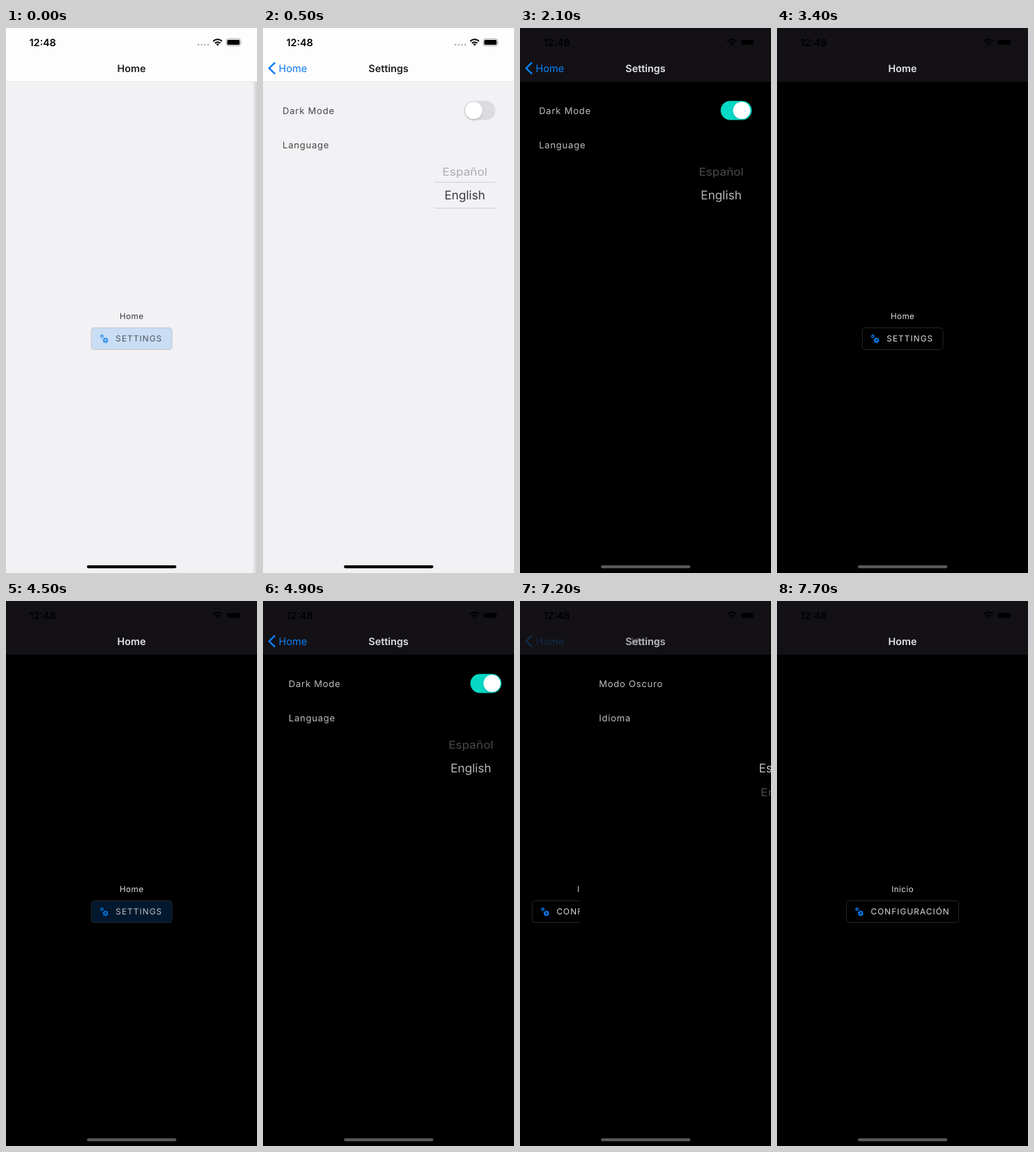
An HTML page for the animation above (8 s loop, 360x779 px).

```html
<!DOCTYPE html>
<html lang="en">
<head>
<meta charset="utf-8">
<title>Theme and language settings</title>
<style>
html, body { margin: 0; width: 100%; height: 100%; overflow: hidden; }
svg {
  display: block; width: 100vw; height: 100vh;
  font-family: Inter, Roboto, sans-serif; text-rendering: geometricPrecision;
  --bg: #f2f1f4; --head: #fefdfe; --rule: #e4e3e6; --ink: #000; --dots: #bcbbbd;
  --title: #1f1f21; --label: #464648; --body: #39393b; --blue: #0a7aee;
  --edge: #c3bebe; --press: #c9def5; --bar: #000; --track: #dcdbdf;
  --row: #3c3c3e; --dim: #adacaf; --line: #cccbce; --shell: #8d8c8e;
}
svg.dark {
  --bg: #000; --head: #131115; --rule: #161518; --ink: #000; --dots: #131115;
  --title: #e4e3e6; --label: #bdbdbf; --body: #dededf; --blue: #0a84ff;
  --edge: #2c2c2d; --press: #02182e; --bar: #585858; --track: #05d8c4;
  --row: #b6b6b8; --dim: #4a4a4b; --line: #000; --shell: #131115;
}
.bg { fill: var(--bg); }
.title { font-size: 14.4px; font-weight: 600; fill: var(--title); text-anchor: middle; }
.label { font-size: 13px; letter-spacing: .78px; fill: var(--label); }
.small { font-size: 11.7px; letter-spacing: .4px; fill: var(--body); text-anchor: middle; }
.caps { font-size: 11.8px; letter-spacing: 1.08px; fill: var(--body); }
.row { font-size: 17.2px; text-anchor: middle; }
.gear circle { fill: none; stroke: var(--blue); }
</style>
</head>
<body>
<svg id="stage" viewBox="0 0 360 779">
  <defs>
    <clipPath id="band"><rect x="230" y="220.5" width="120" height="37"/></clipPath>
    <clipPath id="rest"><path d="M230 180h120v40.5h-120zM230 257.5h120v45h-120z"/></clipPath>
    <linearGradient id="shade"><stop offset="0" stop-opacity="0"/><stop offset="1" stop-opacity=".14"/></linearGradient>
    <filter id="soft" x="-30%" y="-30%" width="160%" height="170%">
      <feDropShadow dx="0" dy="1.6" stdDeviation="1.6" flood-opacity=".18"/>
    </filter>
    <g id="wheel">
      <text id="english" class="row" y="6.3">English</text>
      <text id="spanish" class="row" y="6.3">Español</text>
    </g>
  </defs>

  <g id="home">
    <rect class="bg" width="360" height="779"/>
    <text id="greet" class="small" x="180.2" y="416"></text>
    <rect id="button" y="428.6" height="31" rx="4" stroke="var(--edge)" stroke-width=".9"/>
    <g id="face">
      <g class="gear">
        <circle cx="15.2" cy="440.7" r="1.6" stroke-width="1.1"/>
        <circle cx="15.2" cy="440.7" r="2.3" stroke-width=".9" pathLength="12" stroke-dasharray="1"/>
        <circle cx="20.3" cy="446.4" r="2.3" stroke-width="1.8"/>
        <circle cx="20.3" cy="446.4" r="3.6" stroke-width="1.1" pathLength="12" stroke-dasharray="1"/>
      </g>
      <text id="caption" class="caps" x="34.9" y="448.2"></text>
    </g>
  </g>

  <g id="settings">
    <rect id="shadow" x="-7" width="7" height="779" fill="url(#shade)"/>
    <rect class="bg" width="360" height="779"/>
    <text id="mode" class="label" x="27.2" y="122.7"></text>
    <text id="lang" class="label" x="27.2" y="171.8"></text>
    <rect x="287.8" y="104.2" width="44.6" height="27.2" rx="13.6" fill="var(--track)"/>
    <rect id="knob" y="105.6" height="24.4" rx="12.2" fill="#fff" filter="url(#soft)"/>
    <path d="M245 220.5h88M245 257.5h88" stroke="var(--line)" stroke-width=".9"/>
    <g clip-path="url(#band)" fill="var(--row)"><use href="#wheel"/></g>
    <g clip-path="url(#rest)" fill="var(--dim)"><use href="#wheel"/></g>
  </g>

  <rect width="360" height="76.5" fill="var(--head)"/>
  <rect y="76" width="360" height=".6" fill="var(--rule)"/>
  <text id="homeTitle" class="title" x="180" y="62.7">Home</text>
  <text id="setTitle" class="title" x="180" y="62.7">Settings</text>
  <g id="back">
    <path d="M17.2 49.4L8.9 57.5L17.2 65.6" fill="none" stroke="var(--blue)" stroke-width="2.4"/>
    <text x="22.6" y="62.8" font-size="14.5" fill="var(--blue)">Home</text>
  </g>

  <text x="33.4" y="25.6" font-size="14.4" font-weight="600" fill="var(--ink)">12:48</text>
  <g fill="var(--dots)">
    <circle cx="276" cy="24" r="1.4"/><circle cx="280.7" cy="24" r="1.4"/>
    <circle cx="285.3" cy="24" r="1.4"/><circle cx="290" cy="24" r="1.4"/>
  </g>
  <g fill="none" stroke="var(--ink)" stroke-width="2">
    <path d="M297.2 19a8.8 8.8 0 0 1 12.6 0"/>
    <path d="M299.7 21.7a5.4 5.4 0 0 1 7.6 0"/>
    <path d="M303.5 25.5l-2.1-2.1a3 3 0 0 1 4.2 0z" fill="var(--ink)" stroke="none"/>
  </g>
  <rect x="316" y="15.6" width="20.4" height="9.8" rx="2.6" fill="none" stroke="var(--shell)" stroke-width=".8"/>
  <rect x="317.3" y="16.9" width="17.8" height="7.2" rx="1.5" fill="var(--ink)"/>
  <path d="M337.5 18.9q1.6 1.6 0 3.2z" fill="var(--shell)"/>
  <rect x="116" y="768" width="128.4" height="4.2" rx="2.1" fill="var(--bar)"/>
</svg>
<script>
const LOOP = 8000;
const $ = id => document.getElementById(id);
const clamp = x => Math.min(1, Math.max(0, x));
const ease = x => (x = clamp(x), x * x * (3 - 2 * x));
const within = (t, a, b) => t >= a && t < b;

// critically damped spring from 0 to 1
function spring(ms) {
  const w = Math.sqrt(1000 / 3) * Math.max(0, ms) / 1000;
  return 1 - (1 + w) * Math.exp(-w);
}

// 0 = home screen, 1 = settings screen
function route(t) {
  if (t < 2850) return spring(t - 50);
  if (t < 4600) return 1 - spring(t - 2850);
  if (t < 7150) return spring(t - 4600);
  return 1 - spring(t - 7150);
}

function set(id, attrs) {
  for (const k in attrs) $(id).setAttribute(k, attrs[k]);
}

function setText(id, s) {
  if ($(id).textContent !== s) $(id).textContent = s;
}

function placeRow(id, d) {
  const squash = 1 - 0.1 * Math.abs(d);
  set(id, { transform: `translate(288.6 ${239 + 34 * d}) scale(1 ${squash})` });
}

function draw(t) {
  const p = route(t);
  const dark = t >= 2090;
  const es = t >= 6190;
  const pressed = t < 1000 || within(t, 4490, 5500);
  const held = within(t, 2650, 3500) ? t - 2650 : t >= 7060 ? t - 7060 : 0;

  $('stage').classList.toggle('dark', dark);
  setText('greet', es ? 'Inicio' : 'Home');
  setText('caption', es ? 'CONFIGURACIÓN' : 'SETTINGS');
  setText('mode', es ? 'Modo Oscuro' : 'Dark Mode');
  setText('lang', es ? 'Idioma' : 'Language');

  const width = es ? 161 : 115.6;
  const left = 180.2 - width / 2;
  set('button', { x: left, width, fill: pressed ? 'var(--press)' : 'var(--bg)' });
  set('face', { transform: `translate(${left} 0)`, opacity: pressed ? 0.85 : 1 });

  set('home', { transform: `translate(${-108 * p} 0)` });
  set('settings', { transform: `translate(${360 * (1 - p)} 0)` });
  set('shadow', { opacity: clamp((1 - p) * 20) });
  set('homeTitle', { opacity: 1 - p });
  set('setTitle', { opacity: p });
  set('back', { opacity: p * (1 - 0.7 * clamp(held / 100)) });

  const k = ease((t - 1850) / 290);
  const size = 24.4 + 1.8 * Math.sin(Math.PI * k);
  set('knob', { x: 301.4 + 17.4 * k - size / 2, width: size });

  const v = ease((t - 5840) / 320);
  placeRow('english', v);
  placeRow('spanish', v - 1);
}

const start = performance.now();
function tick() {
  draw((performance.now() - start) % LOOP);
  requestAnimationFrame(tick);
}
tick();
</script>
</body>
</html>
```
